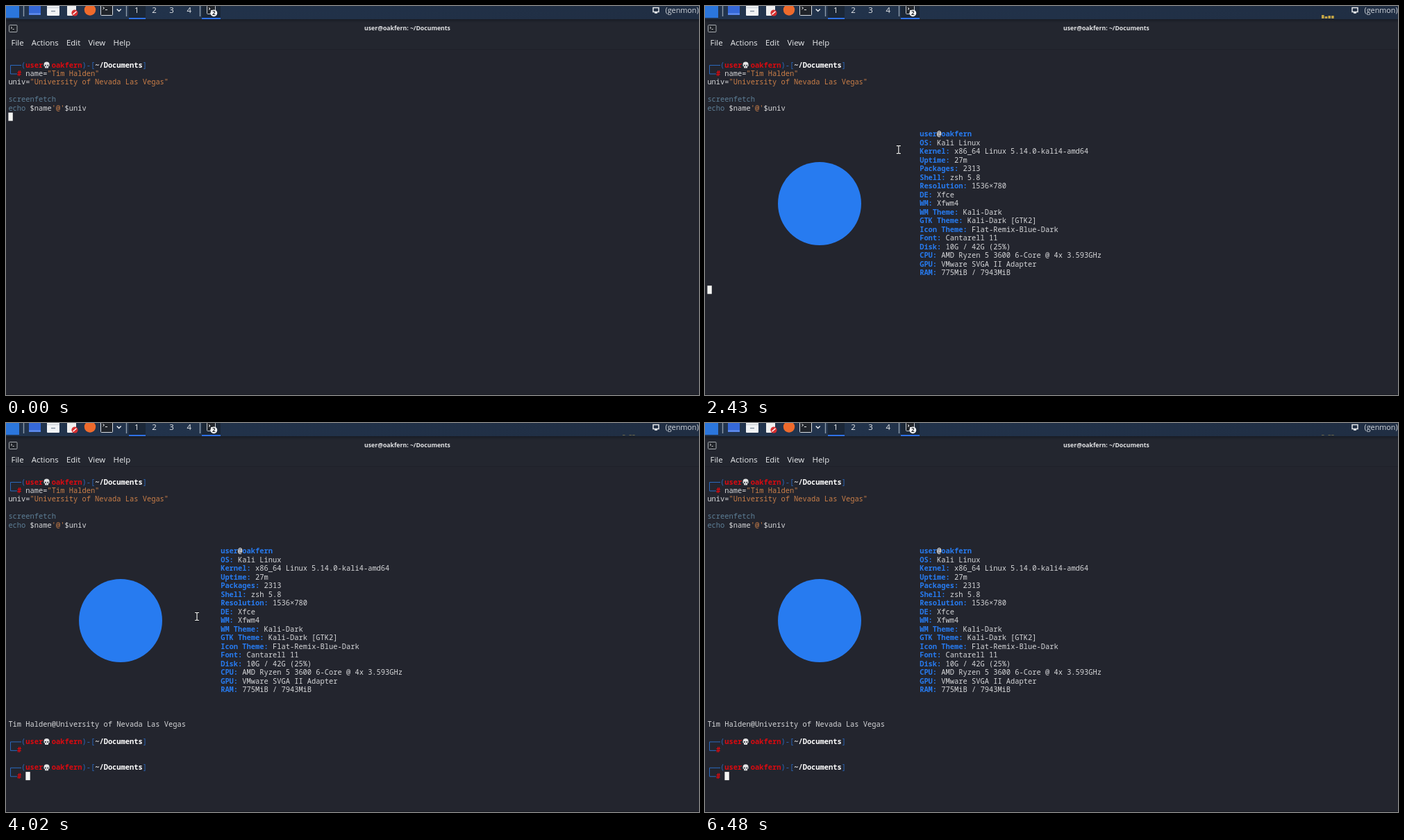
An HTML page for the animation above (6940 ms loop, 998 by 561 pixels).

```html
<!DOCTYPE html>
<html lang="en">
<head>
<meta charset="utf-8">
<title>Terminal session</title>
<style>
  html, body { margin: 0; width: 100%; height: 100%; overflow: hidden; background: #23252e; }
  svg { display: block; width: 998px; height: 561px; }
  text { white-space: pre; }
  .mono { font: 10.4px "Noto Sans Mono", "DejaVu Sans Mono", monospace; font-variant-ligatures: none; }
  .ui { font: 11.4px "Open Sans", "Noto Sans", sans-serif; fill: #eceef0; }
  .menu { font-weight: 500; }
  .title { font-size: 8.7px; font-weight: 700; fill: #e2e3e5; }
  .badge { font-size: 8px; font-weight: 700; fill: #22262c; }
  .status { font-size: 10.8px; fill: #d5dae0; }
  .mid { text-anchor: middle; }
  .plain { fill: #d6d7d9; }
  .str { fill: #cb7f48; }
  .cmd { fill: #5d7f97; }
  .line { fill: #2b69bd; }
  .label { fill: #277bf0; font-weight: 700; }
  .red { fill: #db0a10; font-weight: 700; }
  .path { fill: #fff; font-weight: 700; }
</style>
</head>
<body>
<svg viewBox="0 0 998 561">
  <defs>
    <linearGradient id="bar">
      <stop offset="0" stop-color="#22344d"/>
      <stop offset="1" stop-color="#202e43"/>
    </linearGradient>
    <linearGradient id="shade" x2="0" y2="1">
      <stop offset="0" stop-color="#181c25"/>
      <stop offset="1" stop-color="#23262f"/>
    </linearGradient>
    <g id="skull">
      <path d="M-4-1a4 4 0 0 1 8 0v2l-1.6 1v2h-4.8v-2l-1.6-1z" fill="#e4e5e6"/>
      <path d="M-2.6-.8h1.8v2h-1.8zM.8-.8h1.8v2H.8zM-.4 2h.8v.9h-.8z" fill="#34363e"/>
    </g>
    <path id="beam" d="M-2.5-5.5h1.8L0-4.8l.7-.7h1.8M0-4.8v9.6M-2.5 5.5h1.8L0 4.8l.7.7h1.8"/>
  </defs>

  <rect width="998" height="561" fill="#23252e"/>
  <rect y="19" width="998" height="43" fill="#23262f"/>
  <rect y="19" width="998" height="5" fill="url(#shade)"/>
  <path d="M0 62.5H998" stroke="#1f212a"/>
  <path d="M0 560.5H998" stroke="#191b22"/>

  <g id="panel">
    <rect width="998" height="19" fill="url(#bar)"/>
    <rect width="19" height="17" fill="#2b76dc"/>
    <path d="M25.5 0V15M173.5 0V15M279.5 0V15" stroke="#8e9cab" stroke-width="1.4"/>
    <rect x="33" y="-2" width="17" height="15" fill="#3568d8"/>
    <path d="M33 11.5H50" stroke="#6792ee" stroke-width="2"/>
    <rect x="59" y="-2" width="18" height="16" rx="1" fill="#f1f3f5"/>
    <path d="M59 2.5H77" stroke="#c6cbd1"/>
    <path d="M65 7.5h6" stroke="#8794a4" stroke-width="1.5"/>
    <rect x="88" y="-2" width="13" height="16" rx="1" fill="#f0f0f0"/>
    <circle cx="99" cy="10" r="4.6" fill="#d62f31"/>
    <path d="M96.5 12.3l5-4.6" stroke="#fff" stroke-width="1.5"/>
    <circle cx="121" cy="5.5" r="8.2" fill="#ee6a2c"/>
    <rect x="136.5" y="-3.5" width="17" height="17" rx="1" fill="#20242a" stroke="#d8dce0"/>
    <path d="M139.5 1.5l2 1.5-2 1.7M143 5.5h3" fill="none" stroke="#fff"/>
    <path d="M159.7 4.5l3 3 3-3" fill="none" stroke="#eef1f4" stroke-width="1.4"/>
    <path d="M177 0h24v19h-24zM282 0h27v19h-27z" fill="#1b2737"/>
    <path d="M177 18H201M282 18H309" stroke="#2f72e8" stroke-width="2"/>
    <rect x="289.5" y="-.5" width="12" height="12" rx="1" fill="#22262c" stroke="#c8cdd2"/>
    <path d="M292 2.5l2 1.5-2 1.5M295 6.5h2" fill="none" stroke="#fff"/>
    <circle cx="299.3" cy="10.3" r="4.9" fill="#f5f6f7"/>
    <text class="ui badge mid" x="299.3" y="13.2">2</text>
    <path d="M932 2.5h8v6h-8zM934 10h4" fill="none" stroke="#e6e9ec" stroke-width="1.5"/>
    <text class="ui status" x="949.5" y="10">(genmon)</text>
  </g>

  <rect x="4.5" y="27.5" width="11.5" height="10" rx="1" fill="#22252b" stroke="#a6abb0"/>
  <path d="M7 30l1.7 1.4L7 32.8M9.6 33.5h2" fill="none" stroke="#e6e6e6" stroke-width=".9"/>
  <text class="ui title mid" id="title" x="578" y="35.2"></text>
  <text class="ui menu" id="menu" x="7.5" y="57"></text>

  <g id="typed" class="mono"></g>
  <g id="report" class="mono"><circle cx="165" cy="285" r="60" fill="#277bf0"/></g>
  <g id="after" class="mono"></g>
  <rect id="caret" width="6.4" height="12" fill="#f4f4f2"/>
  <g id="graph" fill="#c4a545"></g>
  <g id="mouse" fill="none" stroke-linecap="square">
    <use href="#beam" stroke="#15171c" stroke-width="2.6"/>
    <use href="#beam" stroke="#f2f2f2" stroke-width="1.2"/>
  </g>
</svg>
<script>
const LOOP = 6940, STEP = 50;
const CELL = 6.24, ROW = 12.48, LEFT = 3.4, TOP = 85;
const ENTER = 470, RUN = 2000, REPORT = 2430, DONE = 2480, EXIT = 5470;
const USER = "user", HOST = "oakfern", PERSON = "Tim Halden";
const SCHOOL = "University of Nevada Las Vegas";

const $ = id => document.getElementById(id);
const colX = col => LEFT + col * CELL;
const rowY = row => TOP + row * ROW;
const easeOut = k => 1 - (1 - k) ** 2;

function add(parent, tag, attrs, content = "") {
  const el = document.createElementNS("http://www.w3.org/2000/svg", tag);
  for (const key in attrs) el.setAttribute(key, attrs[key]);
  el.textContent = content;
  parent.append(el);
  return el;
}

// Runs are [class, text] pairs laid out on the character grid.
function write(parent, row, col, ...runs) {
  for (const [cls, str] of runs) {
    add(parent, "text", { class: cls, x: colX(col), y: rowY(row) + 3.5 }, str);
    col += str.length;
  }
}

function prompt(parent, row) {
  const x = colX(.5), y = rowY(row) + .5;
  add(parent, "path", {
    d: `M${colX(3)} ${y}H${x}V${y + ROW}H${colX(2)}`,
    fill: "none", stroke: "#2b69bd"
  });
  write(parent, row, 3, ["line", "("], ["red", USER]);
  add(parent, "use", { href: "#skull", x: colX(9) - 1, y });
  write(parent, row, 10, ["red", HOST], ["line", ")-["], ["path", "~/Documents"], ["line", "]"]);
  write(parent, row + 1, 2, ["red", "#"]);
}

function drawDesktop() {
  for (let n = 1; n <= 4; n++)
    add($("panel"), "text", { class: "ui mid", x: 163 + n * 25.2, y: 10 }, n);
  $("title").textContent = `${USER}@${HOST}: ~/Documents`;
  ["File", "Actions", "Edit", "View", "Help"].forEach((item, i) =>
    add($("menu"), "tspan", { dx: i ? 11.3 : 0 }, item));
}

function drawTerminal() {
  const typed = $("typed"), report = $("report"), after = $("after");
  prompt(typed, 0);
  write(typed, 1, 4, ["plain", "name="], ["str", `"${PERSON}"`]);
  write(typed, 2, 0, ["plain", "univ="], ["str", `"${SCHOOL}"`]);
  write(typed, 4, 0, ["cmd", "screenfetch"]);
  write(typed, 5, 0, ["cmd", "echo "], ["plain", "$name"], ["str", "'@'"], ["plain", "$univ"]);

  write(report, 8, 49, ["label", USER], ["path", "@"], ["label", HOST]);
  [
    "OS: Kali Linux", "Kernel: x86_64 Linux 5.14.0-kali4-amd64", "Uptime: 27m",
    "Packages: 2313", "Shell: zsh 5.8", "Resolution: 1536×780", "DE: Xfce",
    "WM: Xfwm4", "WM Theme: Kali-Dark", "GTK Theme: Kali-Dark [GTK2]",
    "Icon Theme: Flat-Remix-Blue-Dark", "Font: Cantarell 11", "Disk: 10G / 42G (25%)",
    "CPU: AMD Ryzen 5 3600 6-Core @ 4x 3.593GHz", "GPU: VMware SVGA II Adapter",
    "RAM: 775MiB / 7943MiB"
  ].forEach((line, i) => {
    const cut = line.indexOf(":") + 1;
    write(report, 9 + i, 49, ["label", line.slice(0, cut)], ["plain", line.slice(cut)]);
  });

  write(after, 28, 0, ["plain", `${PERSON}@${SCHOOL}`]);
  prompt(after, 30);
  prompt(after, 33);
}

// Each stroke of the pointer starts where the last one ended.
const entry = { x: 850, y: 523 };
const strokes = [
  { from: ENTER, to: 840, x: 230, y: 213 },
  { from: 1470, to: 1790, x: 284, y: 208 },
  { from: 2380, to: 2700, x: 266, y: 205 },
  { from: 3110, to: 3820, x: 278, y: 263 },
  { from: 3820, to: 4020, x: 275, y: 279 },
  { from: 4020, to: 4250, x: 290, y: 319 },
  { from: 4250, to: 4560, x: 375, y: 281 },
  { from: 4560, to: 4730, x: 352, y: 274 },
  { from: 4830, to: 5130, x: 814.5, y: 443 },
  { from: 5130, to: EXIT, x: 880, y: 541 }
];

function pointerAt(t) {
  let { x, y } = entry;
  for (const s of strokes) {
    if (t < s.from) break;
    const held = Math.floor((t - s.from) / STEP) * STEP;
    const k = t >= s.to ? 1 : easeOut(held / (s.to - s.from));
    x += (s.x - x) * k;
    y += (s.y - y) * k;
  }
  return [x, y];
}

// Load peaks as the report is printed, then fades to an idle flicker.
const loadAt = t => t < REPORT ? 0 : Math.max(.15, Math.exp((REPORT - t) / 300));
const noise = n => Math.abs(Math.sin(n * 12.9898) * 43758.5453) % 1;
const bars = Array.from({ length: 4 }, (_, i) =>
  add($("graph"), "rect", { x: 888 + i * 4.7, width: 3.6 }));

function drawGraph(t) {
  const load = loadAt(Math.floor(t / 10) * 10);
  bars.forEach((bar, i) => {
    const height = Math.round(5 * load * (.6 + .4 * noise(i + 1)));
    bar.setAttribute("y", 18 - height);
    bar.setAttribute("height", height);
  });
  $("graph").setAttribute("opacity", Math.min(1, .3 + load));
}

const show = (el, on) => { el.style.visibility = on ? "visible" : "hidden"; };

function drawCaret(t) {
  const row = t < RUN ? 6 : t < REPORT ? 7 : t < DONE ? 26 : 34;
  $("caret").setAttribute("x", colX(t < DONE ? 0 : 4));
  $("caret").setAttribute("y", rowY(row) - 6.2);
}

function draw(t) {
  show($("report"), t >= REPORT);
  show($("after"), t >= DONE);
  show($("mouse"), t >= ENTER && t < EXIT);
  $("mouse").setAttribute("transform", `translate(${pointerAt(t)})`);
  drawCaret(t);
  drawGraph(t);
}

function tick() {
  draw(performance.now() % LOOP);
  requestAnimationFrame(tick);
}

drawDesktop();
drawTerminal();
tick();
</script>
</body>
</html>
```
